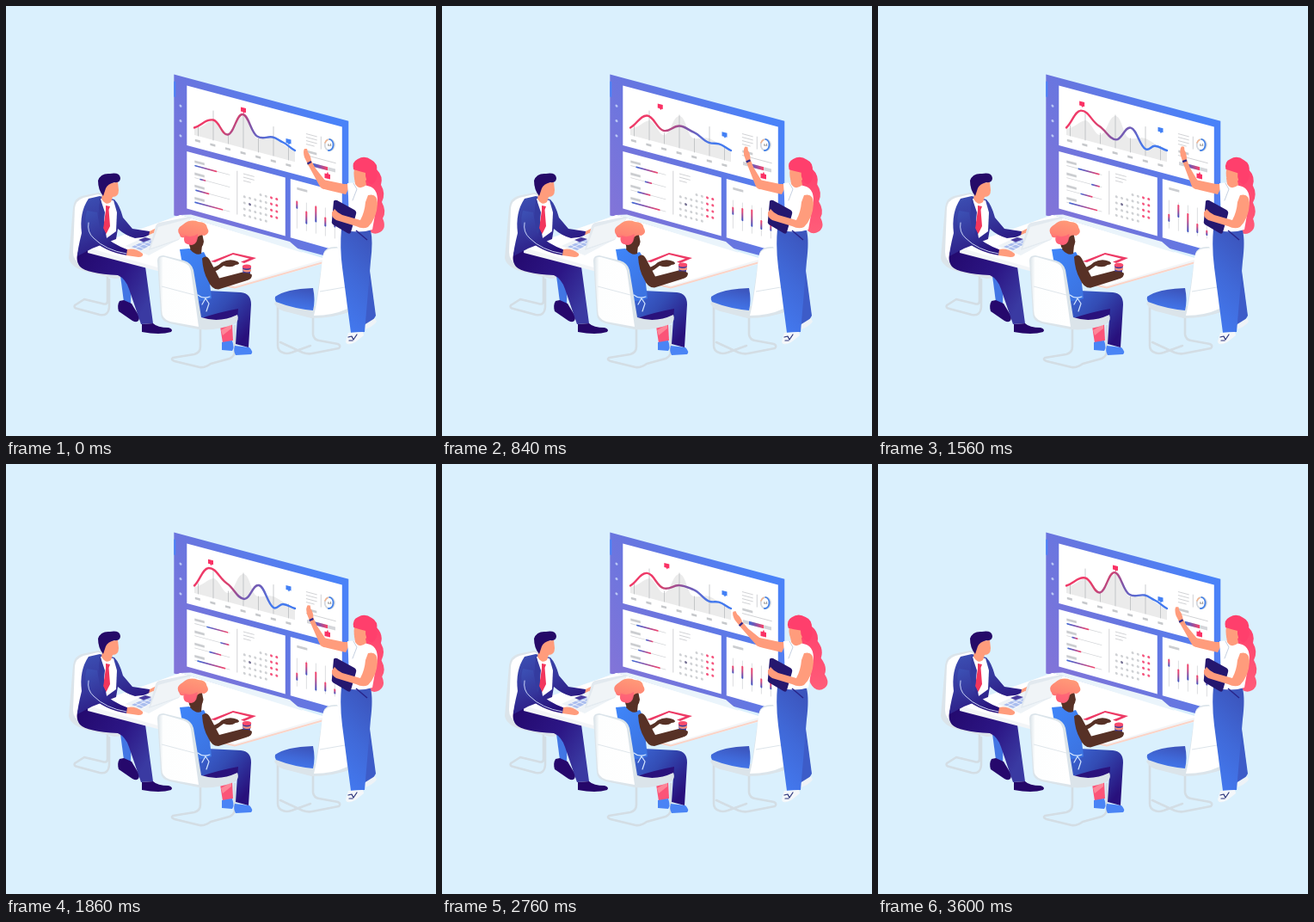
Animation, 500 px wide and 500 px high, one loop 3.66 s. Source, as an HTML page:

```html
<!DOCTYPE html>
<html lang="en">
<head>
<meta charset="utf-8">
<title>Team presentation</title>
<style>
  html, body { margin: 0; width: 100%; height: 100%; overflow: hidden; background: #daf0fd; }
  svg { display: block; width: 100vw; height: 100vh; }
  .line { fill: none; stroke-linecap: round; stroke-linejoin: round; }
  .leg { fill: none; stroke: #d3dde4; stroke-width: 2.6; stroke-linecap: round; stroke-linejoin: round; }
  .skin { fill: #ff9c7c; }
  .brown { fill: #573126; }
</style>
</head>
<body>
<svg viewBox="0 0 500 500">
  <defs>
    <linearGradient id="frame" gradientUnits="userSpaceOnUse" x1="0" y1="160" x2="185" y2="15">
      <stop stop-color="#8274d8"/><stop offset=".5" stop-color="#6676e0"/><stop offset="1" stop-color="#4a82f8"/>
    </linearGradient>
    <linearGradient id="curveInk" gradientUnits="userSpaceOnUse" x1="256" y1="121" x2="308" y2="166">
      <stop stop-color="#ee3a68"/><stop offset=".2" stop-color="#d5426f"/><stop offset=".5" stop-color="#7d55a8"/><stop offset="1" stop-color="#4379ee"/>
    </linearGradient>
    <linearGradient id="bar"><stop stop-color="#3d69d8"/><stop offset=".4" stop-color="#7d55b0"/><stop offset="1" stop-color="#fa4268"/></linearGradient>
    <linearGradient id="slot" x2="0" y2="1"><stop stop-color="#fa4268"/><stop offset=".3" stop-color="#d94a7c"/><stop offset="1" stop-color="#3452c4"/></linearGradient>
    <linearGradient id="suit" x1=".1" y1="0" x2=".6" y2="1"><stop stop-color="#3c50b4"/><stop offset=".5" stop-color="#35369c"/><stop offset="1" stop-color="#27107a"/></linearGradient>
    <linearGradient id="slacks" x2="1" y2=".6"><stop stop-color="#23086c"/><stop offset=".6" stop-color="#2c1685"/><stop offset="1" stop-color="#3a3aa2"/></linearGradient>
    <linearGradient id="top" x2=".6" y2="1"><stop stop-color="#3f86fa"/><stop offset="1" stop-color="#3c74e2"/></linearGradient>
    <linearGradient id="jeans" x1="0" y1="0" x2=".9" y2=".8"><stop stop-color="#3c68d8"/><stop offset=".45" stop-color="#334cb4"/><stop offset="1" stop-color="#28107c"/></linearGradient>
    <linearGradient id="trousers" x1=".6" y1="0" x2=".3" y2="1"><stop stop-color="#3c55bd"/><stop offset=".5" stop-color="#4069d8"/><stop offset="1" stop-color="#4379ef"/></linearGradient>
    <linearGradient id="curls" x1=".6" y1="0" x2=".3" y2="1"><stop stop-color="#ff9a78"/><stop offset=".6" stop-color="#ff8474"/><stop offset="1" stop-color="#ff5575"/></linearGradient>
    <linearGradient id="hair" x2="0" y2="1"><stop stop-color="#ff3d6c"/><stop offset="1" stop-color="#ff5d79"/></linearGradient>
    <linearGradient id="shell"><stop stop-color="#dde5ea"/><stop offset=".12" stop-color="#fdfefe"/><stop offset="1" stop-color="#fff"/></linearGradient>
  </defs>

  <!-- wall screen -->
  <g id="screen" transform="matrix(1 .267 0 1 195.3 79.5)">
    <rect width="203" height="164" fill="url(#frame)"/>
    <path d="M0 8H2V26H0Z" fill="#4a82f8"/>
    <path fill="#fff" d="M15 8.9H195.5V78.4H15ZM15 85.4H129.5V153.5L15 151.9ZM135.5 85.4H195.5V154.5L135.5 153.5Z"/>
    <g fill="#b9c6f5"><circle cx="7.7" cy="34.6" r="1.5"/><circle cx="7.7" cy="52" r="1.5"/><circle cx="7.7" cy="69.4" r="1.5"/></g>
    <path class="line" stroke="#c9cbce" stroke-width=".8" d="M154 28H166M154 32H166M154 36H166M154 40H163M171 27V41M154 53H188M73.5 93V143M81 94H93M81 98H93M81 102H89"/>
    <g fill="#cbcdd0"><rect x="154" y="47" width="12" height="2.6"/><rect x="143" y="93" width="12" height="2.8"/></g>
  </g>
  <g id="chart">
    <path fill="#ebebeb" d="M219 143C230 141 234 134 241 133C248 134 252 150 258 150C266 150 268 128 276 128C284 128 285 153 293 154C301 155 305 152 311 154C322 159 328 166 336 169V181.3L219 150Z"/>
    <path class="line" stroke="#b4b6b9" stroke-width=".7" d="M223.5 139V151M241 122V156M258.5 148V160M276 127V165M293.5 154V170M311 140.5V174M328.5 163V179"/>
    <path id="curve" class="line" stroke="url(#curveInk)" stroke-width="2.4"/>
    <path id="pinkPin" fill="#fa3265" d="M-3-3.5L3-2V3L1.5 2.6L.5 4L-.8 2L-3 1.5Z"/>
    <path id="bluePin" fill="#4280f5" d="M-3-3.5L3-2V3L1.5 2.6L.5 4L-.8 2L-3 1.5Z"/>
  </g>
  <g>
    <ellipse cx="376.3" cy="161.5" rx="5.6" ry="6.6" fill="none" stroke="#d3d8df" stroke-width="1.8"/>
    <path class="line" stroke="#4280e8" stroke-width="1.8" d="M376.3 155A5.6 6.6 0 0 1 375 168"/>
    <path class="line" stroke="#f4b48e" stroke-width="1.4" d="M371 159A5.6 6.6 0 0 1 374 155.5"/>
    <text x="376.3" y="163" text-anchor="middle" font-size="4" font-family="Roboto, sans-serif" fill="#555">64</text>
    <path d="M350 181L383 189.5V193.5L350 185Z" fill="#d4d6da"/>
    <path d="M357 182.8L374 187.2V191.2L357 186.8Z" fill="url(#bar)"/>
    <path d="M370.5 194.5L373 195L374 192.5L375 195.5L377 196V201.5L370.5 200Z" fill="#fa3265"/>
  </g>

  <!-- left chair -->
  <path class="leg" d="M118 315V343Q118 348 112 346L91 341L80 348Q78 351 83 352L109 359Q119 361 120 350V318"/>
  <path d="M78 234Q79 224 88 221L107 217Q114 217 114 225L124 300L138 309Q140 316 126 317L94 309Q75 304 73 293Z" fill="#dbe4ea"/>
  <path d="M80 235Q81 226 90 223L107 219Q112 219 113 226L120 292L88 300Q78 297 78 286Z" fill="#fff"/>

  <!-- seated man, legs -->
  <path d="M132 306L146 311L145 347L137 344Z" fill="#4276e4"/>
  <path d="M137 342L146 346L155 361Q155 370 147 366L131 355Q129 348 132 343Z" fill="#26086c"/>
  <path d="M86 281Q79 294 86 303Q94 311 130 313Q139 317 143 329L157 370L171 369L162 303Q158 291 140 289L119 285Z" fill="url(#slacks)"/>
  <path d="M158 370L171 369Q176 374 189 374Q195 376 192 379Q179 383 158 379Z" fill="#250769"/>

  <!-- table -->
  <path d="M95 281L203 243L371 294V299L266 328L180 309L95 287Z" fill="#f3f5f7"/>
  <path d="M180 307L266 326.5L371 296.5V298.5L266 328.5L180 309Z" fill="#fbd3c6"/>
  <path d="M95 281L203 243L371 294L266 325L180 305Z" fill="#fff"/>
  <path d="M203 243L215 242.5L330 274L345 287Z" fill="#eaf4fb"/>

  <!-- seated man, upper body -->
  <g>
    <path d="M96 224L109 221L126 225Q132 231 136 246L147 259L167 262V268L150 270Q139 267 130 259L128 271L100 282L83 291Q83 284 88 264Q85 240 96 224Z" fill="url(#suit)"/>
    <path d="M110 224L125 226L129 240L128 262L117 270Z" fill="#fff"/>
    <path d="M116 232L121 233L119.5 237L121 256L116.5 265L113 258L116 238Z" fill="#f2365c"/>
    <path d="M109 222L115 240L112 268L116 274L106 268Z" fill="#343b9f"/>
    <path d="M94 238Q89 254 98 270Q115 286 141 290L143 284Q121 276 110 263L106 240" fill="url(#suit)"/>
    <path class="line" stroke="#d9e3ff" stroke-width=".9" d="M96 252Q94 263 102 270Q116 284 140 288"/>
    <path d="M167 262L177 257Q179 263 172 268L166 268Z" class="skin"/>
    <path d="M114 210L116 206L130 205L131 214Q131 222 124 222L122 228Q116 233 111 224Z" class="skin"/>
    <path d="M107 203Q110 194 121 195Q132 193 133 200Q133 206 126 205Q118 207 116 212L113 221Q107 214 107 203Z" fill="#250a68"/>
  </g>

  <!-- laptop and papers -->
  <path d="M139 279L171 264L198 273L166 290Z" fill="#eef3f7"/>
  <path d="M146 280L166 271L176 274L157 284Z" fill="#a9bdee"/>
  <path class="line" stroke="#fff" stroke-width=".7" d="M150 278L162 283M155 275L167 280M160 273L172 278M150 282L170 272"/>
  <path d="M154 272L162 269L169 271L160 274.5Z" fill="#493b9e"/>
  <path d="M174 256Q175 253 178 252L213 245Q216 245 214 248L201 272L166 284Z" fill="#e2e9ef"/>
  <path d="M177 257L214 247L201 271L168 282Z" fill="#f0f4f7"/>
  <path d="M141 283Q150 281 159 288Q160 292 154 292L140 290Z" class="skin"/>
  <path d="M238 297L264 287L291 293L277 299L273 297.5L283 293.8L264 289L243 298Z" fill="#ed3a65"/>

  <!-- right chair -->
  <path class="leg" d="M316 350V395Q316 401 322 403Q326 405 332 403L354 395M357 361V382Q358 388 364 389L386 393Q390 395 387 398L356 404Q351 405 345 403L319 391"/>
  <path d="M312 346Q316 354 328 356L355 363Q382 363 404 354L397 300L385 280Q372 279 369 288L360 349L316 341Z" fill="#dbe4ea"/>
  <path d="M368 292Q370 283 379 282L391 281L397 352Q380 360 358 360Q364 335 368 292Z" fill="#fff"/>
  <path d="M365 332L394 327" stroke="#dce4ea" fill="none"/>
  <path d="M313 338Q325 329 357 328Q360 342 357 354Q335 352 314 344Q312 341 313 338Z" fill="url(#trousers)"/>

  <!-- seated woman -->
  <path class="leg" d="M226 375V396Q226 403 219 405L194 409Q191 411 196 413L225 420Q231 421 238 416L260 410Q267 407 266 399V372"/>
  <path d="M248 366L263 369L264 389L252 392Z" fill="#fb5478"/>
  <path d="M250 377L262 370V375L252 383Z" fill="#fd8698"/>
  <path d="M251 391L263 389Q266 398 263 401L251 400Z" fill="#4a84f5"/>
  <path d="M266 395L283 397Q288 402 285 405L267 406Q264 401 266 395Z" fill="#4a84f5"/>
  <path d="M222 338Q222 332 234 331L273 333Q285 334 285 347L282 397L267 393L269 363Q247 369 225 364Z" fill="url(#jeans)"/>
  <path d="M224 364Q247 356 270 352L269 365Q250 370 228 368Z" fill="#2a127c"/>
  <g id="sitter">
    <path d="M236 305Q245 304 251 298Q260 293 269 297Q274 300 267 301Q262 305 253 302Q246 308 238 311Z" class="brown"/>
    <path d="M202 283L213 282L223 288L230 286Q239 301 236 314L239 340Q226 346 212 341Z" fill="url(#top)"/>
    <path d="M215 278L228 278L227 288Q221 291 214 283Z" class="brown"/>
    <g id="cup">
      <path d="M228 292Q233 287 237 294L248 315L275 308Q281 306 285 311Q287 316 279 318L247 328Q239 328 235 318Q229 308 228 292Z" class="brown"/>
      <path d="M275 302L285 302L283 314Q279 316 276 314Z" fill="#3b3898"/>
      <ellipse cx="280" cy="301.5" rx="5.2" ry="2.5" fill="#f74b6d"/>
      <path d="M275 304Q280 307 285 304V307Q280 309 276 307Z" fill="#f4917f"/>
      <path d="M273 310Q280 307 286 311Q286 317 278 317Z" class="brown"/>
    </g>
    <g id="curlyHead">
      <path d="M210 266L228 264L230 274Q229 282 222 283L214 281Z" class="brown"/>
      <path d="M202 266Q197 259 206 254Q214 247 224 251Q233 251 234 258Q238 264 231 267Q225 265 222 270Q221 280 212 277Q206 276 207 269Q203 270 202 266Z" fill="url(#curls)"/>
      <path d="M208 267Q216 270 223 265Q224 276 216 278Q207 278 208 267Z" fill="#ff5f78" opacity=".75"/>
    </g>
  </g>
  <path d="M176 296Q176 290 183 290L207 296Q216 299 218 307L227 362Q248 369 269 359Q272 366 265 370Q244 378 224 376L190 369Q180 366 180 358Z" fill="#dbe4ea"/>
  <path d="M177 296Q178 291 185 292L206 298Q213 300 215 308L224 373L191 367Q181 364 181 354Z" fill="url(#shell)"/>
  <path d="M181 326L219 336" stroke="#dfe6eb" fill="none"/>
  <path class="line" stroke="#d4e6ff" stroke-width="1.2" d="M223 336Q229 341 237 338M232 340L236 346L233 355M232 340L228 347"/>

  <!-- presenter -->
  <g id="tailPivot"><path id="tail" fill="url(#hair)"/></g>
  <path d="M413 325L422 300L430 360Q426 369 416 372Z" fill="#3d5cc8"/>
  <path d="M413 373L429 363L431 367Q426 374 414 377Z" fill="#eef3f7"/>
  <path d="M390 259Q407 255 424 261Q427 273 424 297L417 379L401 380L391 304Q388 281 390 259Z" fill="url(#trousers)"/>
  <path d="M398 380L415 379L416 383L406 391Q396 396 395 390Z" fill="#f4f7fa"/>
  <path class="line" stroke="#283078" stroke-width="1.2" d="M398 385L402 384L404 388L408 382M399 389L403 389"/>
  <path class="skin" d="M369 202Q364 203 365 209Q368 213 374 214L395 219L401 207L393 207Z"/>
  <g id="forearm"><path class="skin" d="M364 208L352 186L347 176Q345 169 347 166L350 166L351 170Q354 173 355 180L360 189L372 204Q376 211 371 213Q366 213 364 208Z"/>
    <path d="M350.5 183.5L355 181" stroke="#312b8a" stroke-width="2.4"/></g>
  <path d="M397 206L409 205L420 209Q432 211 432 226L426 260Q410 265 392 260L399 236Z" fill="#fff"/>
  <path class="skin" d="M405 200L417 198L419 208Q411 215 406 207Z"/>
  <path class="line" stroke="#b6c5d8" stroke-width=".8" d="M404 206L408 213L403 226"/>
  <path d="M381 227Q382 225 385 226L405 237Q408 239 407 242L401 263Q400 266 397 264L380 254Q378 252 379 249Z" fill="#25176f"/>
  <path class="skin" d="M421 220Q432 217 432 230Q431 247 421 257Q415 260 407 256L384 249Q378 246 379 240L382 236Q386 241 391 243L412 249Q417 240 418 228Z"/>
  <path d="M407 261L420 272" stroke="#29258a" stroke-width="1.5"/>
  <g id="head">
    <path class="skin" d="M405 189L418 188L420 201Q416 207 408 206Q403 200 405 189Z"/>
    <path d="M404 190Q402 181 409 178Q417 173 425 179Q433 183 431 193Q433 203 425 208Q417 203 418 194Q410 192 404 190Z" fill="#ff3f6c"/>
  </g>
</svg>
<script>
const LOOP = 3660;
const TIMES = [0, 450, 1230, 1860, 2370, 2730, 3120];
const NS = 'http://www.w3.org/2000/svg';
const $ = id => document.getElementById(id);
const mix = (a, b, k) => a + (b - a) * k;

function add(parent, tag, attrs) {
  const el = document.createElementNS(NS, tag);
  for (const k in attrs) el.setAttribute(k, attrs[k]);
  return parent.appendChild(el);
}

// Smooth periodic interpolation of values placed at TIMES.
function sway(v, t) {
  const n = TIMES.length;
  const at = i => TIMES[(i + n) % n] + LOOP * Math.floor(i / n);
  const val = i => v[(i + n) % n];
  const slope = i => (val(i + 1) - val(i - 1)) / (at(i + 1) - at(i - 1));
  let i = n - 1;
  while (TIMES[i] > t) i--;
  const d = at(i + 1) - at(i), u = (t - at(i)) / d, w = 1 - u;
  return w * w * (1 + 2 * u) * val(i) + u * u * (3 - 2 * u) * val(i + 1)
    + d * u * w * (w * slope(i) - u * slope(i + 1));
}

const screen = $('screen');
for (let i = 0; i < 7; i++)
  add(screen, 'rect', { x: 24.5 + i * 17.6, y: 68.7, width: 6, height: 2.6, fill: '#c6c8cb' });

for (let r = 0; r < 5; r++) for (let c = 0; c < 7; c++) {
  if ((r === 0 && c < 3) || (r === 4 && c > 4)) continue;
  const fill = c > 4 ? '#f5567f' : r === 2 && c === 1 ? '#777394' : '#cfd1d4';
  add(screen, 'circle', { cx: 82 + c * 6.25, cy: 113.2 + r * 7.2, r: 1.5, fill });
}

// Each range: start and end of the coloured part, at rest and at the far pose.
const bars = [[24, 50, 38, 63], [30, 37, 54, 64], [25, 41, 41, 55], [24, 57, 27, 60]].map((range, i) => {
  const y = 99 + i * 14.2;
  add(screen, 'rect', { x: 24, y: y - 5.5, width: 11.5, height: 2.8, fill: '#cbcdd0' });
  add(screen, 'rect', { x: 24, y: y + .2, width: 41, height: .8, fill: '#d3d5d8' });
  return { range, el: add(screen, 'rect', { y: y - .2, height: 1.7, rx: .8, fill: 'url(#bar)' }) };
});
const slots = [[109, 118, 125, 134], [118, 133, 110, 125], [109, 128, 118, 140], [119, 130, 127, 138], [119, 128, 132, 138]].map((range, i) => {
  const x = 143 + i * 11;
  add(screen, 'rect', { x: x - .4, y: 108, width: .8, height: 33, fill: '#d3d5d8' });
  return { range, el: add(screen, 'rect', { x: x - 1, width: 2, rx: 1, fill: 'url(#slot)' }) };
});

function slide({ el, range: [a, b, c, d] }, pos, size, k) {
  const from = mix(a, c, k);
  el.setAttribute(pos, from);
  el.setAttribute(size, mix(b, d, k) - from);
}

// x, y at rest, then x, y at the far pose
const nodes = [[219, 141.5, 219, 141.5], [241, 132.5, 235.5, 121], [258, 149.5, 257, 139], [275, 126, 277, 157],
  [292, 151.5, 294, 141], [310, 152.5, 311, 167], [322, 158.5, 322, 163], [336, 168, 336, 168]];

function curvePath(k) {
  const p = nodes.map(([a, b, c, d]) => [mix(a, c, k), mix(b, d, k)]);
  const slope = i => {
    const a = p[Math.max(i - 1, 0)], b = p[Math.min(i + 1, p.length - 1)];
    return .75 * (b[1] - a[1]) / (b[0] - a[0]);
  };
  return p.slice(1).reduce((d, [x, y], i) => {
    const [px, py] = p[i], h = (x - px) * .42;
    return d + `C${px + h} ${py + h * slope(i)} ${x - h} ${y - h * slope(i + 1)} ${x} ${y}`;
  }, 'M' + p[0]);
}

const tailShape = 'M415 182Q428 178 431 190Q439 198 436 208Q442 218 437 228Q443 239 438 247Q443 258 435 263Q428 267 423 262Q416 254 422 244Q417 231 423 219L415 206Z';
const bendTail = s => tailShape.replace(/(\d+) (\d+)/g, (_, x, y) => {
  const k = Math.max(0, y - 190) / 72;
  return `${+x + s * .55 * k ** 1.5} ${y}`;
});
const move = (id, value) => $(id).setAttribute('transform', value);

function draw(now) {
  const t = now % LOOP;
  const k = (1 - Math.cos(2 * Math.PI * t / LOOP)) / 2;
  $('curve').setAttribute('d', curvePath(k));
  bars.forEach(b => slide(b, 'x', 'width', k));
  slots.forEach(s => slide(s, 'y', 'height', k));

  const pinX = sway([276, 268, 241, 238, 250, 260.5, 270], t);
  move('pinkPin', `translate(${pinX} ${114.2 + (pinX - 238) * .18})`);
  move('bluePin', `translate(328.5 ${sway([157.5, 155, 145, 144.5, 145, 150, 155], t)})`);

  const swing = sway([0, 7, -2, -1, 7, 9.5, 6.5], t);
  const tilt = `rotate(${-swing * .5} 412 206)`;
  $('tail').setAttribute('d', bendTail(swing));
  move('tailPivot', tilt);
  move('head', tilt);
  move('forearm', `rotate(${-sway([0, -4.5, -8.5, -5, 10, 12.5, 9.5], t)} 369 208)`);
  move('cup', `translate(0 ${sway([1.5, 0, -.5, 0, -.5, 0, 0], t)})`);
  move('curlyHead', `translate(${sway([0, 1.5, -.5, -.5, 0, 0, 0], t)} 0)`);
}

const start = performance.now();
(function tick() {
  draw(performance.now() - start);
  requestAnimationFrame(tick);
})();
</script>
</body>
</html>
```
